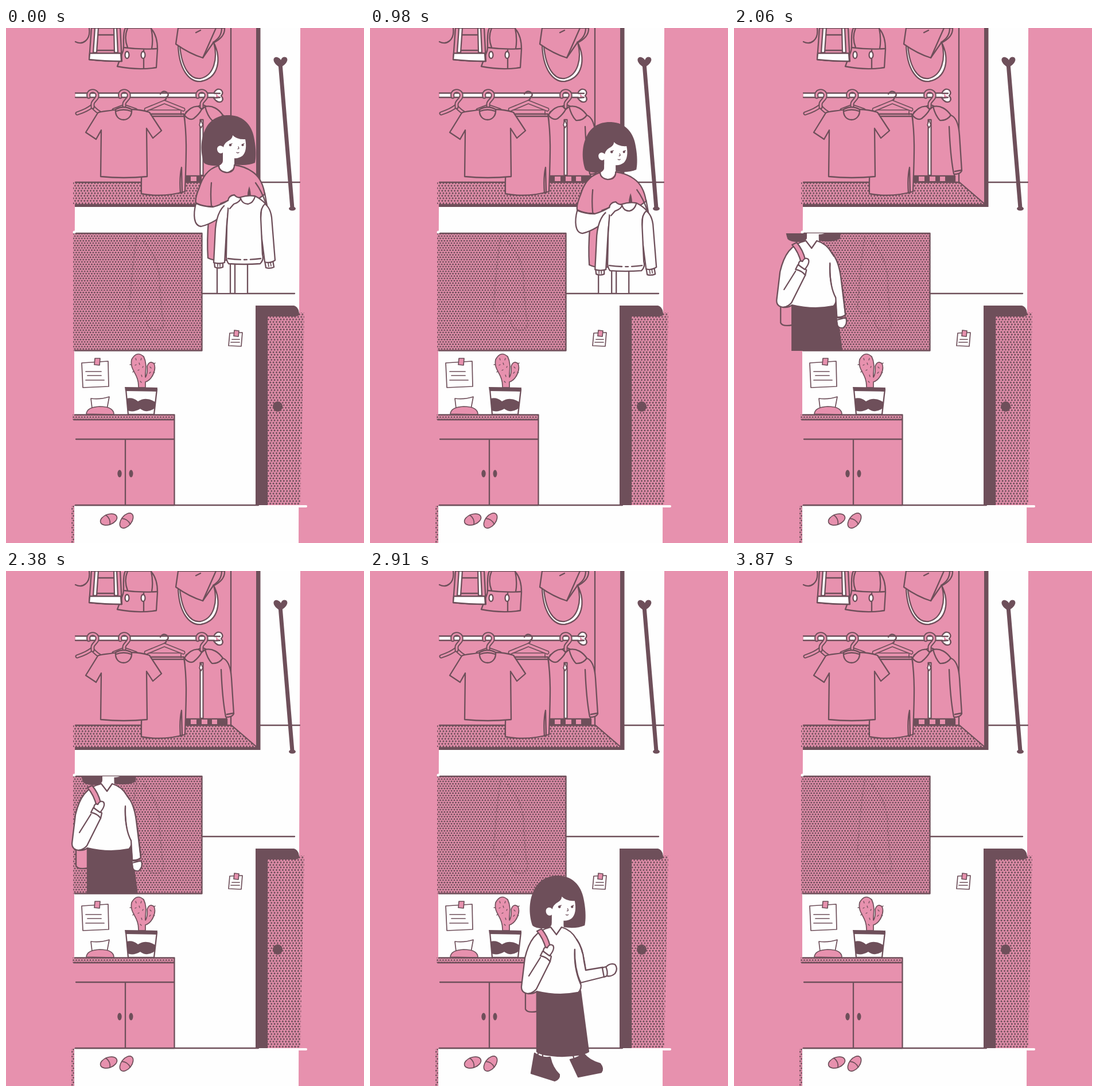
An HTML page that plays this animation: 624 px wide and 898 px high, repeating every 3980 ms.

```html
<!DOCTYPE html>
<html lang="en">
<head>
<meta charset="utf-8">
<title>Getting dressed</title>
<style>
html, body { margin: 0; width: 100%; height: 100%; overflow: hidden; background: #e791ae; }
svg { display: block; width: 100vw; height: 100vh; }
.l { fill: none; }
.p { fill: #e791ae; }
.w { fill: #fefefe; }
.d { fill: #6e4f5a; }
.l, .p, .w, .d { stroke: #6e4f5a; stroke-width: 2.3; stroke-linecap: round; stroke-linejoin: round; }
.n { stroke: none; }
.t { stroke-width: 1.7; }
</style>
</head>
<body>
<svg viewBox="0 0 624 898" preserveAspectRatio="none">
<defs>
  <pattern id="dots" width="5.4" height="8.8" patternUnits="userSpaceOnUse">
    <g fill="#6e4f5a"><circle cx="1.7" cy="2.2" r="1.62"/><circle cx="3.7" cy="6.6" r="1.62"/><circle cx="-1.7" cy="6.6" r="1.62"/></g>
  </pattern>
  <pattern id="fine" width="4.9" height="8.2" patternUnits="userSpaceOnUse">
    <g fill="#6e4f5a"><circle cx="2.45" cy="2" r="1.6"/><circle cx="0" cy="6.1" r="1.6"/><circle cx="4.9" cy="6.1" r="1.6"/></g>
  </pattern>
  <clipPath id="aboveFloor"><path d="M0 0H624V462H0Z"/></clipPath>
  <clipPath id="mirrorBand"><path d="M0 358H624V563H0Z"/></clipPath>

  <g id="head">
    <path class="w n" d="M378 210V232Q377 238 370 241Q384 262 399 240L398 222Z"/>
    <path class="d n" d="M345 235C338 215 340 193 346 180C354 159 372 151 390 152C416 153 430 172 433 195C436 211 436 226 434 235Q420 241 398 238L398 226H378V231Q378 237 371 240Q350 241 345 235Z"/>
    <path class="w n" d="M379 208C382 195 394 198 395 187Q403 195 417 194Q421 214 412 223Q405 228 397 227L398 238H378V217C374 221 368 217 368 211C368 205 375 203 379 208Z"/>
    <path class="l" style="stroke-width:1.3" d="M391 203L394 201.500M412 203L415 201.500M405 207L406 210L404 211M402 217Q404 218.500 406 217"/>
    <g class="d n"><circle cx="391" cy="204" r="2.300"/><circle cx="412.500" cy="204" r="2.100"/></g>
  </g>

  <g id="skirt">
    <path class="p" d="M271 733L271 764Q274 771 291 768V733Z"/>
    <path class="d" d="M291 732H367L381 838Q370 845 335 846Q300 845 291 838Z"/>
  </g>
  <g id="torso">
    <path class="w" d="M315 621C289 627 277 645 270 675L264 725Q264 737 278 737Q286 737 291 733Q328 742 363 735Q370 728 367 718L376 696C373 672 368 652 360 642Q351 626 334 621L325 634Z"/>
    <path class="l" d="M357 660Q355 692 367 720"/>
    <path class="p" d="M291 628L299 624Q310 637 314 654L307 660Q302 640 291 628Z"/>
    <path class="w n" d="M299 669L278 705L289 732L315 680Z"/>
    <path class="l" d="M297 674L277 706M314 681L290 729Q284 736 276 737"/>
    <path class="w" d="M301 663L297 671Q308 673 314 681L316 672Q309 664 301 663Z"/>
    <path class="w" d="M302 663Q303 654 309 657Q313 649 319 653Q323 659 313 671Q307 667 302 663Z"/>
  </g>
</defs>

<path fill="#e791ae" d="M0 0H624V898H0Z"/>
<path class="w n" d="M443 0H513L511 490L510 898H119V563L120 311H443Z"/>
<path class="l" d="M443 269H512M342 463H503M120 832H440"/>

<g id="closet">
  <path class="p n" d="M119 0H440V309H119Z"/>
  <path fill="url(#dots)" d="M117 269H393L436 307H117Z"/>
  <path class="l" d="M392 0V269M121 269H393L436 306"/>
  <path class="d n" d="M436 0H443.500V312H120V307H436Z"/>
  <path class="l" d="M121 24C133 30 148 22 145 0"/>

  <path class="p" d="M208 0C202 12 207 30 204 40L194 67Q230 74 262 69L264 37Q264 12 252 0Z"/>
  <path class="l" d="M205 34Q235 38 263 36M212 0Q205 17 212 34M253 0Q257 20 254 36M240 37V70"/>
  <ellipse class="w" cx="211" cy="47" rx="3.500" ry="6"/><ellipse class="w" cx="239" cy="47" rx="3.500" ry="6"/>
  <path class="p" d="M149 0L145 55Q172 58 202 58L199 0Z"/>
  <path class="w" d="M146 44H200L201 58Q172 58 145 55Z"/>
  <path class="w" d="M155 0L152 43H158L161 0ZM188 0L189 43H195L193 0Z"/>
  <path class="l" d="M161 12H187M159 39H188"/>

  <path class="p n" d="M302 30C300 72 318 94 340 92C370 86 374 54 361 25Z"/>
  <path class="w" d="M300 28C301 72 319 95 340 93C371 87 376 54 362 25C370 54 362 83 339 88C320 90 306 68 303 31Z"/>
  <path class="p" d="M300 0L296 28Q320 45 343 52L361 26Q382 16 381 0Z"/>
  <path class="l" d="M343 52L366 0M361 25Q376 16 376 0M331 8L339 4"/>

  <path class="w n" d="M121 113H366V121H121Z"/>
  <path class="l" d="M121 113.500H363M121 121H363"/>
  <path class="w" d="M363 112Q368 104 375 108Q380 113 375 118Q380 124 376 128Q369 132 362 122L373 121M363 114H373"/>
  <g id="hangers"></g>
  <path class="p" d="M311 152C317 142 327 135 336 137L341 142L347 137C360 134 371 142 378 152Q391 157 393 187L397 249Q394 255 384 255V268H313Z"/>
  <path class="l" d="M375 172Q377 223 383 254M385 250L396 248M311 152Q319 162 327 158Q337 150 341 142M347 137Q351 153 359 161Q371 162 378 152"/>
  <path class="w" d="M338.500 160H343.500V257H338.500Z"/>
  <path class="w t" d="M340 161L343 169L340 174L337 169Z"/>
  <path class="d" d="M313 258H385V268H313Z"/>
  <path class="p n" d="M322 259H332V267H322ZM341 259H351V267H341ZM359 259H368V267H359Z"/>

  <path class="p" d="M246 150H310C316 190 314 225 312 285Q275 296 236 289C235 240 240 200 246 150Z"/>
  <path class="l" d="M245 154H311M304 288Q302 260 306 243L307 287M276 126Q280 125 279 121Q286 117 280 112Q274 108 269 115"/>
  <path class="p t" d="M276 126L311 140Q313 144 309 145L276 132L245 145Q240 145 242 140Z"/>
  <path class="l t" d="M249 143H304M247 145V151M305 145V151"/>

  <path class="p" d="M193 142C180 145 165 145 160 148L139 182L157 194L166 178L165 259Q205 263 246 259L245 175L256 192L271 179L250 147Q235 142 217 142Z"/>
  <path class="p" d="M191 142Q205 134 219 142C220 153 213 160 205 160C196 160 190 153 191 142Z"/>
  <path class="l" d="M192 145Q205 140 218 145"/>
</g>

<path class="l" style="stroke-width:7" d="M478 62L499 314"/>
<path class="d n" d="M478 69C462 60 465 49 473 51Q478 53 479 56Q482 49 488 51C494 55 488 64 478 69Z"/>
<ellipse class="d n" cx="499" cy="315" rx="6" ry="3.500"/>

<path class="p n" d="M119 358H342V563H119Z"/>
<path fill="url(#fine)" d="M117 358H342V563H117Z"/>
<path class="l" d="M120 358H341.500V562.500H120"/>
<path class="l" opacity=".45" stroke-dasharray="1 4" d="M228 364Q222 400 219 440L215 490Q225 505 240 492M240 372Q270 405 268 450L272 500Q280 525 262 527Q245 527 245 505"/>
<circle class="w n" cx="119" cy="356" r="2.500"/>

<g id="room">
  <path class="w t" d="M132 584L178 581L179 625L134 627Z"/>
  <path class="l t" d="M139 599H166M142 606H166M139 614H171"/>
  <path class="p t" d="M155 576H164L163 588L154 587Z"/>
  <path class="w t" d="M390 532L412 531L410 555L388 554Z"/>
  <path class="l t" d="M394 543H407M392 548H407"/>
  <path class="p t" d="M398 527L406 528L405 538L397 537Z"/>

  <path class="p t" d="M231 627C232 602 215 598 219 578Q228 562 240 573C247 587 242 600 243 609Q247 603 246 590Q250 579 258 585C263 597 253 615 243 617V627Z"/>
  <path class="l" style="stroke-width:1.3" d="M226 576L227 579M236 576L235 579M225 588L227 587M232 584L233 587M238 592L239 590M230 597L232 596M236 605L237 608M234 616L236 618M251 591L253 593M250 602L252 600M218 587L216 587M223 598L221 600M258 586L260 584M257 600L259 601"/>
  <path class="w" d="M209 630H263L258 674H213Z"/>
  <path class="d n" d="M207 626L264 627L263 634L208 633Z"/>
  <path class="d n" d="M210 646Q221 643 230 651Q244 642 260 652L259 663Q246 673 234 664Q222 671 212 667Z"/>

  <path class="w t" d="M150 663L148 646Q165 648 180 643L176 664Z"/>
  <path class="p t" d="M140 673Q141 661 163 660Q188 660 188 674Z"/>

  <path class="p n" d="M118 674H294V832H118Z"/>
  <path fill="url(#fine)" d="M116 674H294V683H116Z"/>
  <path class="l" d="M120 674.500H293.500V832H121M118 683H293M122 717H293M208 717V832"/>
  <ellipse class="d n" cx="198" cy="777" rx="3.700" ry="6.500"/><ellipse class="d n" cx="218" cy="777" rx="3.500" ry="6.500"/>
  <path fill="url(#fine)" d="M114 833H119V898H114Z"/>

  <g id="slipper" transform="translate(179 857) rotate(-20)">
    <ellipse class="p t" rx="15" ry="9"/><path class="l t" d="M-2 -9Q4 0 -1 9"/>
  </g>
  <use href="#slipper" transform="translate(210 859) rotate(-32) translate(-179 -857)"/>

  <path class="p n" d="M456 496H518L512 832H456Z"/>
  <path fill="url(#dots)" d="M456 496H520L513 832H456Z"/>
  <path class="d n" d="M435 484H502Q511 487 511 500Q508 504 498 503H456V832H435Z"/>
  <ellipse class="d n" cx="473.500" cy="660" rx="8.500" ry="9"/>
  <path d="M511 834H523" stroke="#fefefe" stroke-width="4" stroke-linecap="round"/>
</g>

<g clip-path="url(#aboveFloor)"><g id="choose">
  <path class="w" d="M368 400V470H391V400ZM399 400V470H421V400Z"/>
  <path class="p" d="M353 335Q350 372 352 401Q366 408 390 404V335Z"/>
  <use href="#head"/>
  <path class="w" d="M440 290L451 288L455 310H440Z"/>
  <path class="p" d="M371 240C350 246 342 262 337 278Q329 297 331 305Q345 312 360 311L362 325H438L441 297L451 290Q447 263 430 251Q416 241 398 239Q398 252 384 252Q371 250 371 240Z"/>
  <path class="l" d="M358 270Q356 290 358 310M435 270Q446 285 453 306"/>
  <path class="d n" d="M424 276Q420 287 421 297H427Q427 285 424 276Z"/>
  <path class="w" d="M331 306C326 325 327 345 340 346Q363 341 392 315L395 303L388 300Q376 308 361 312Q345 312 331 306Z"/>
  <path class="w" d="M363 408L364 417Q371 420 378 417L378 408ZM451 406L453 418Q460 420 467 417L465 405Z"/>
  <path class="l t" d="M369 411V416M373 411V416M457 410L458 416M461 409L462 415"/>
  <path class="w" d="M389 304C373 311 367 329 365 350L362 409Q371 412 381 409L385 340ZM446 304Q460 309 463 330L469 405Q460 411 451 408L443 345Z"/>
  <path class="w" d="M388 304Q400 297 409 295Q421 291 434 293Q444 298 452 306Q443 314 444 330L447 395Q450 404 443 411Q415 413 388 411Q383 404 384 395L385 345Z"/>
  <path class="l" stroke-dasharray="22 6 5 6" d="M387 402Q415 406 444 402"/>
  <path class="l" d="M409 297Q412 307 422 307Q431 305 434 294"/>
  <path class="w n" d="M380 309L388 300Q389 293 398 292L409 298L392 316Z"/>
  <path class="l" d="M374 306L387 301Q388 292 398 291Q402 296 409 296Q409 303 397 307L390 315"/>
</g></g>

<g clip-path="url(#mirrorBand)"><g id="pass">
  <use href="#head" transform="translate(-70.500 370) scale(1.025 1.045) translate(0 2.300)"/>
  <use href="#skirt"/>
  <path class="w" d="M368 755L370 768Q372 774 380 773Q388 767 385 756Z"/>
  <path class="w" d="M355 640L364 648C380 690 380 718 384 750Q378 755 369 754L366 720Q356 700 355 640Z"/>
  <use href="#torso"/>
  <path class="w n" d="M359 650L366 648C377 670 379 705 381 735L369 735L366 719Q357 700 359 650Z"/>
  <path class="l" d="M360 642Q372 655 376 685Q380 718 384 750M357 662Q356 700 367 720L369 754M369 759L385 755"/>
</g></g>

<g id="leave">
  <use href="#head" transform="translate(-70.500 370) scale(1.025 1.045) translate(0 2.300)"/>
  <path class="w" d="M294 834L292 848H301V834ZM351 834L356 852L366 846L362 834Z"/>
  <path class="d" d="M287 841Q299 850 314 848Q318 867 330 878Q331 886 322 889L281 876Z"/>
  <path class="d" d="M349 852Q363 849 372 841Q382 854 401 859Q408 868 403 874L363 882Z"/>
  <use href="#skirt"/>
  <use href="#torso"/>
  <path class="w n" d="M359 660L372 668L376 695L407 690L412 706L368 718Z"/>
  <path class="l" d="M360 642Q371 657 373 680L376 696L406 691M357 660Q356 692 367 718L411 707"/>
  <path class="w" d="M411 691Q418 683 427 686Q433 693 427 702Q420 708 412 706Z"/>
  <path class="w" d="M405 692L411 690Q415 698 413 706L408 708Z"/>
</g>
</svg>
<script>
const LOOP = 3980, STEP = 106.9, LEAD = 20;
const el = id => document.getElementById(id);

// Outlined pink tubes for the hangers
const tube = (d, w = 7) => [['#6e4f5a', w], ['#e791ae', w - 4]].map(([c, s]) =>
  `<path d="${d}" fill="none" stroke="${c}" stroke-width="${s}" stroke-linecap="round" stroke-linejoin="round"/>`).join('');
const hook = x => tube(`M${x - 8} 120C${x - 11} 108 ${x + 4} 107 ${x + 7} 115C${x + 9} 124 ${x} 126 ${x - 1} 132V138`);
el('hangers').innerHTML =
  tube('M124 149Q142 143 150 136Q158 146 168 150') + hook(152) +
  tube('M188 143L206 136L226 143') + hook(207) +
  tube('M316 148L342 136L368 148') + hook(342);

function place(id, on, x, y) {
  const g = el(id);
  g.style.display = on ? '' : 'none';
  g.setAttribute('transform', `translate(${x.toFixed(2)} ${y.toFixed(2)})`);
}

function draw(ms) {
  const i = Math.max(0, Math.floor((ms - LEAD) / STEP));
  const s = i ? (i * STEP + LEAD + 3) / 1000 : 0;

  const a = 38 * s - 4.1 * s * s;
  place('choose', i < 13, a, a * 0.4);

  const b = s - 1.52;
  place('pass', i >= 14 && i < 26, -247.5 + 96.3 * b + 22.2 * b * b, -250);

  place('leave', i >= 26 && i < 36, 85 * (s - 2.91), 0);
}

function tick(now) {
  draw(now % LOOP);
  requestAnimationFrame(tick);
}
draw(0);
requestAnimationFrame(tick);
</script>
</body>
</html>
```
